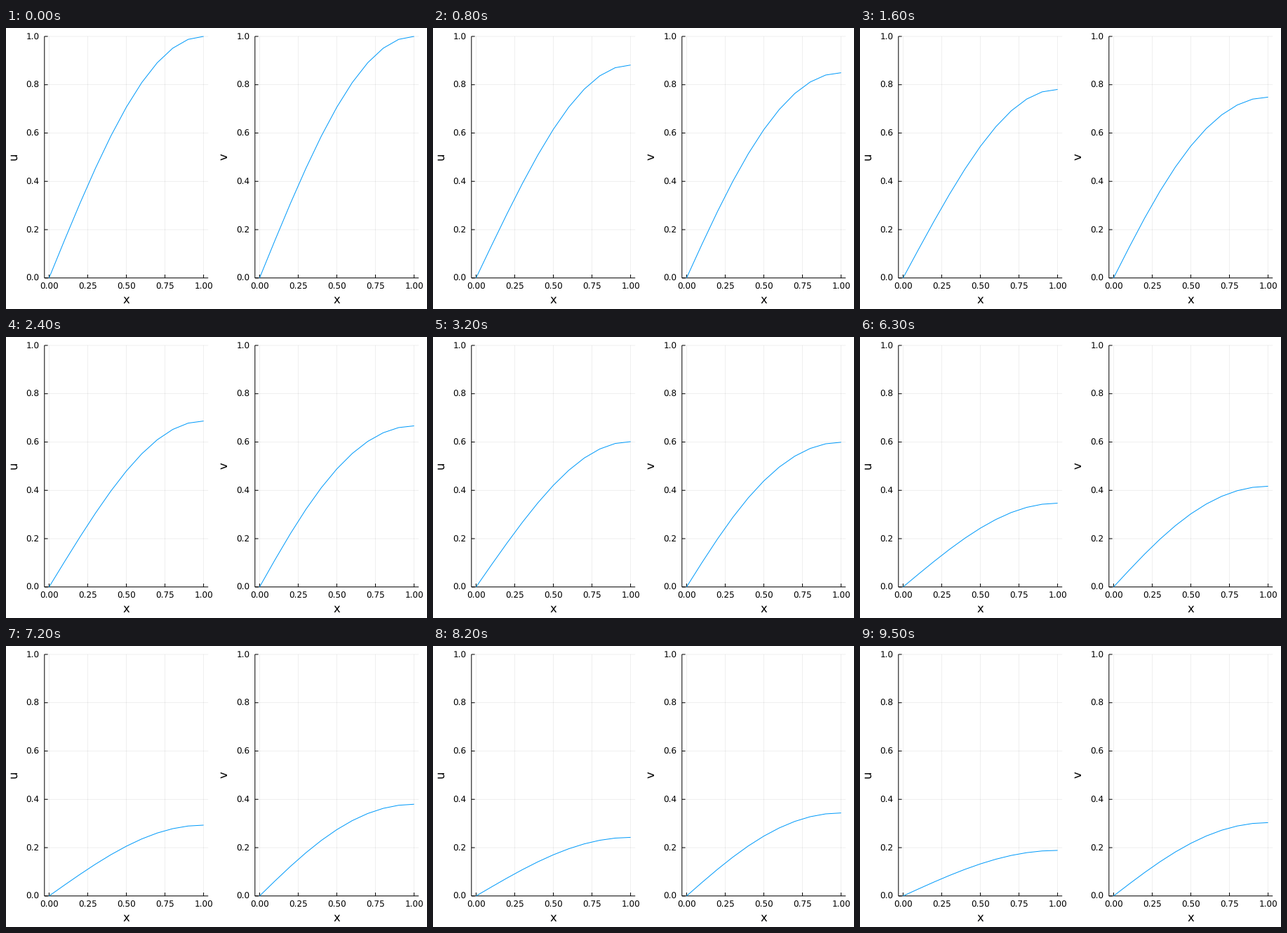
Animation of 600 by 400 pixels, one loop 9600 ms. Source, as a matplotlib script:

```python
import numpy as np
import matplotlib.pyplot as plt
from matplotlib.animation import FuncAnimation

plt.rcParams["font.family"] = "DejaVu Sans"
plt.rcParams["text.hinting"] = "none"

W, H, DPI = 600, 400, 100
PX = 72 / DPI  # one pixel in points
FRAMES, INTERVAL = 96, 100

# Panel geometry in pixels, y pointing down
LEFT, RIGHT, TOP, BOTTOM = 54.8, 288.2, 11.95, 355.8
X0, X1 = 61.4, 281.6
PANEL_STEP = 300
TICK = 4.8
GRID_STYLE = {"alpha": 0.1, "lw": 0.6 * PX, "zorder": 1}

# Reaction-diffusion model: u_t = DU u_xx + uv, v_t = DV v_xx - uv
DU, DV = 0.868, 0.306
GRID = np.linspace(0, 1, 11)
DX = GRID[1] - GRID[0]


def apply_bounds(w):
    """Zero value at x = 0, zero slope at x = 1."""
    w[:, 0] = 0
    w[:, -1] = (4 * w[:, -2] - w[:, -3]) / 3
    return w


def rate(w):
    w = apply_bounds(w.copy())
    u, v = w[:, 1:-1]
    lap = (w[:, 2:] - 2 * w[:, 1:-1] + w[:, :-2]) / DX**2
    out = np.zeros_like(w)
    out[0, 1:-1] = DU * lap[0] + u * v
    out[1, 1:-1] = DV * lap[1] - u * v
    return out


def advance(w, span, substeps=6):
    h = span / substeps
    for _ in range(substeps):
        k1 = rate(w)
        k2 = rate(w + h / 2 * k1)
        k3 = rate(w + h / 2 * k2)
        k4 = rate(w + h * k3)
        w = apply_bounds(w + h / 6 * (k1 + 2 * k2 + 2 * k3 + k4))
    return w


def model_time(n):
    """Steps are a little longer at the start, then even."""
    return 0.01035 * n + 0.0162 * (1 - np.exp(-n / 3))


def solve():
    states = [np.tile(np.sin(np.pi * GRID / 2), (2, 1))]
    times = model_time(np.arange(FRAMES))
    for span in np.diff(times):
        states.append(advance(states[-1], span))
    return states


def to_x(x, dx):
    return dx + X0 + (X1 - X0) * x


def to_y(y):
    return BOTTOM - (BOTTOM - TOP) * y


fig = plt.figure(figsize=(W / DPI, H / DPI), dpi=DPI, facecolor="white")
ax = fig.add_axes([0, 0, 1, 1])
ax.set_xlim(0, W)
ax.set_ylim(H, 0)
ax.axis("off")


def stroke(xs, ys, **style):
    style = {"color": "black", "lw": PX, "solid_capstyle": "butt",
             "snap": False, **style}
    return ax.plot(xs, ys, **style)[0]


def label(x, y, text, size, **style):
    ax.text(x, y, text, fontsize=size * PX, va="baseline", **style)


def draw_panel(dx, name):
    left, right = LEFT + dx, RIGHT + dx
    for x in np.linspace(0, 1, 5):
        px = to_x(x, dx)
        stroke([px, px], [TOP, BOTTOM], **GRID_STYLE)
        stroke([px, px], [BOTTOM - TICK, BOTTOM], zorder=3)
        label(px, 372, f"{x:.2f}", 12, ha="center")
    for y in np.linspace(0, 1, 6):
        py = to_y(y)
        stroke([left, right], [py, py], **GRID_STYLE)
        stroke([left, left + TICK], [py, py], zorder=3)
        label(dx + 47.6, py + 4.5, f"{y:.1f}", 12, ha="right")
    stroke([left, right], [BOTTOM, BOTTOM], zorder=3)
    stroke([left, left], [TOP, BOTTOM], zorder=3)

    label(dx + (LEFT + RIGHT) / 2, 391.6, "x", 16.5, ha="center")
    label(dx + 15.3, (TOP + BOTTOM) / 2 - 0.8, name, 16.5, ha="center",
          rotation=90, rotation_mode="anchor")
    return stroke(to_x(GRID, dx), to_y(GRID), color="#009AFA", zorder=4)


curves = [draw_panel(i * PANEL_STEP, name) for i, name in enumerate("uv")]
states = solve()


def update(n):
    for curve, values in zip(curves, states[n]):
        curve.set_ydata(to_y(values))
    return curves


anim = FuncAnimation(fig, update, frames=FRAMES, interval=INTERVAL,
                     init_func=lambda: update(0), repeat=True, repeat_delay=0)
plt.show()
```
